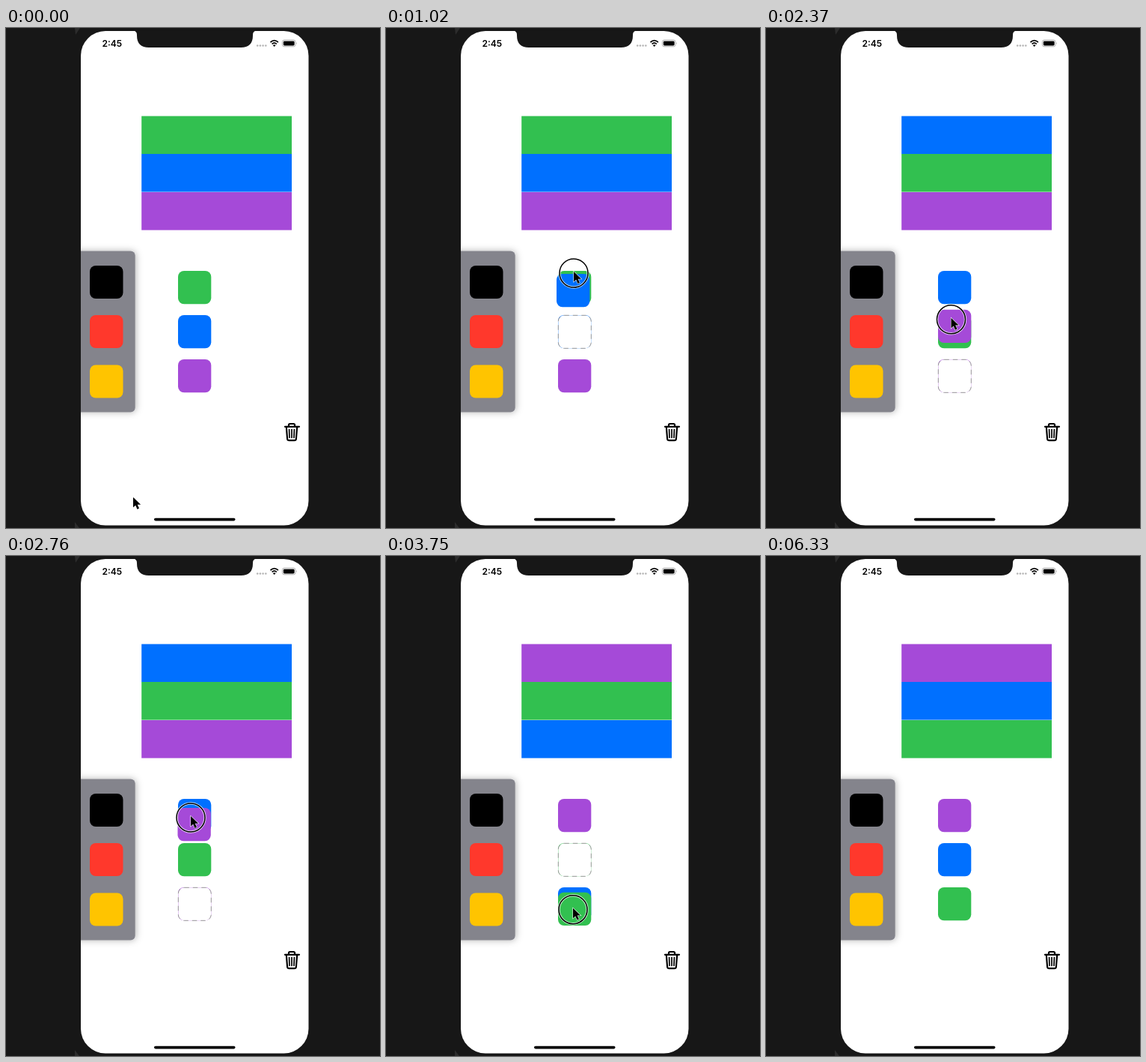
Animation of 500x667 px, one loop 6.36 s. Source, as an HTML page:

```html
<!DOCTYPE html>
<html lang="en">
<head>
<meta charset="utf-8">
<title>Colour swap</title>
<style>
html, body { margin: 0; width: 100%; height: 100%; overflow: hidden; background: #171717; }
svg { display: block; }
.clock { font: 600 12px Inter, Arial, sans-serif; }
.line { fill: none; stroke: #000; stroke-linecap: round; stroke-linejoin: round; }
</style>
</head>
<body>
<svg width="500" height="667" viewBox="0 0 500 667">
  <defs>
    <clipPath id="screen"><rect x="100" y="4" width="304.5" height="659.5" rx="33"/></clipPath>
    <filter id="shadow" x="-30%" y="-20%" width="160%" height="140%">
      <feDropShadow dx="1" dy="0" stdDeviation="5" flood-opacity=".3"/>
    </filter>
  </defs>
  <rect width="500" height="667" fill="#171717"/>
  <path d="M92 0h7l-6 9zM92 659l6 8h-6z" fill="#2c2c2c"/>
  <g clip-path="url(#screen)">
    <rect x="100" y="4" width="305" height="660" fill="#fff"/>
    <rect x="80" y="297.5" width="92.7" height="215" rx="6" fill="#84848c" filter="url(#shadow)"/>
    <rect x="112" y="317" width="44.5" height="44" rx="8"/>
    <rect x="112" y="383" width="44.5" height="44" rx="8" fill="#ff382c"/>
    <rect x="112" y="449.5" width="44.5" height="44" rx="8" fill="#ffc400"/>
  </g>
  <path d="M170 3.5Q175 4 175 9v1q0 16 16 16h123q16 0 16-16v-1Q330 4 335 3.5z" fill="#171717"/>

  <text class="clock" x="128.5" y="25">2:45</text>
  <g fill="#b5b5b5">
    <circle cx="336.2" cy="23.5" r="1.3"/><circle cx="339.9" cy="23.5" r="1.3"/>
    <circle cx="343.6" cy="23.5" r="1.3"/><circle cx="347.3" cy="23.5" r="1.3"/>
  </g>
  <path d="M353.5 19q5.2-4.6 10.4 0M355.6 21.3q3.1-2.7 6.2 0" fill="none" stroke="#000" stroke-width="1.7"/>
  <path d="M356.8 22.9q1.9-1.4 3.8 0l-1.9 2z"/>
  <rect x="369.4" y="16" width="17.6" height="8.8" rx="2.6" fill="none" stroke="#aaa" stroke-width=".9"/>
  <rect x="370.8" y="17.4" width="14.8" height="6" rx="1.4"/>
  <path d="M388 19q1.5 1.4 0 2.8z" fill="#aaa"/>

  <g class="line" stroke-width="2.2">
    <path d="M373 531.8h19M378 531v-1.5q0-1.5 1.5-1.5h5q1.5 0 1.5 1.5v1.5"/>
    <path d="M374.8 532l1.3 16q.2 2.2 2.4 2.2h7q2.2 0 2.4-2.2l1.3-16"/>
    <path d="M378.6 535.5l.4 11M382 535.5v11M385.4 535.5l-.4 11" stroke-width="1.7"/>
  </g>
  <rect x="198" y="653.8" width="108.5" height="3.6" rx="1.8"/>

  <g id="bars"></g>
  <g id="tiles"></g>
  <rect id="gap" x="230.3" width="44" height="44" rx="8" fill="#fff" stroke="#999" stroke-dasharray="6.5 5"/>
  <rect id="held" width="44.3" height="44.3" rx="8"/>
  <g id="pointer">
    <g id="touch" fill="none">
      <circle r="19" stroke="#fff" stroke-opacity=".7" stroke-width="3.4"/>
      <circle r="19" stroke="#000" stroke-width="1.5"/>
    </g>
    <path d="M0-2v13.6l3.2-2.9 2.3 5.2 2.5-1.1-2.3-5h4.4z" stroke="#fff" stroke-width="1.1" paint-order="stroke"/>
  </g>
</svg>
<script>
const LOOP = 6360;
const GREEN = '#32c050', BLUE = '#0070ff', PURPLE = '#a54ad8';
const slotY = [324, 383, 442];

// Pointer path: time, x, y
const path = [
  [0, 170, 628], [30, 170, 628], [300, 213, 500], [570, 253, 382], [780, 253, 382],
  [1020, 251, 327], [1170, 251, 326], [1440, 251, 326], [1740, 241, 427],
  [1920, 247.5, 455], [2100, 247.5, 455], [2370, 247.5, 389], [2640, 247, 349],
  [2880, 247, 349], [3240, 250, 406], [3420, 250, 406], [3810, 250, 476],
  [4110, 250, 476], [4530, 250, 458], [4800, 250, 458], [5340, 206, 460]
];
const HIDE = 5370;

// Each drag: touch down, lift, drop, source slot, target slot
const drags = [
  [570, 810, 1200, 1, 0],
  [1950, 2130, 2850, 2, 0],
  [3270, 3450, 3960, 1, 2]
];

const $ = id => document.getElementById(id);
const set = (el, attrs) => { for (const k in attrs) el.setAttribute(k, attrs[k]); };
const show = (el, on) => set(el, { visibility: on ? 'visible' : 'hidden' });
const addRect = (parent, attrs) => {
  const el = document.createElementNS('http://www.w3.org/2000/svg', 'rect');
  set(el, attrs);
  return parent.appendChild(el);
};

const bars = [117.5, 168, 219].map(y =>
  addRect($('bars'), { x: 181.2, y, width: 200.8, height: 50.6 }));
const tiles = slotY.map(y =>
  addRect($('tiles'), { x: 230, y, width: 44.3, height: 44.3, rx: 8 }));

const slope = (i, axis) => path[i] && path[i + 1]
  ? (path[i + 1][axis] - path[i][axis]) / (path[i + 1][0] - path[i][0]) : 0;

// Harmonic mean keeps the curve from overshooting and stops it at rests
const tangent = (i, axis) => {
  const a = slope(i - 1, axis), b = slope(i, axis);
  return a * b > 0 ? 2 * a * b / (a + b) : 0;
};

function pointerAt(t) {
  const next = path.findIndex(p => p[0] > t);
  if (next < 0) return path.at(-1).slice(1);
  const i = next - 1, span = path[next][0] - path[i][0], u = (t - path[i][0]) / span;
  return [1, 2].map(axis => {
    const a = path[i][axis], b = path[next][axis];
    return a + (b - a) * u * u * (3 - 2 * u)
      + span * u * (1 - u) * ((1 - u) * tangent(i, axis) - u * tangent(next, axis));
  });
}

function draw(t) {
  const order = [GREEN, BLUE, PURPLE];
  const [x, y] = pointerAt(t);
  let touching = false, drag = null;
  for (const d of drags) {
    const [down, lift, drop, from, to] = d;
    if (t >= drop) [order[from], order[to]] = [order[to], order[from]];
    else if (t >= down) {
      touching = true;
      if (t >= lift) drag = d;
    }
  }
  order.forEach((fill, i) => {
    set(bars[i], { fill });
    set(tiles[i], { fill });
  });
  show($('gap'), drag);
  show($('held'), drag);
  if (drag) {
    const [down, , , from] = drag, [grabX, grabY] = pointerAt(down);
    set($('gap'), { y: slotY[from] + .3 });
    set($('held'), { x: 230 + x - grabX, y: slotY[from] + y - grabY, fill: order[from] });
  }
  set($('pointer'), { transform: `translate(${x} ${y})`, display: t < HIDE ? 'inline' : 'none' });
  show($('touch'), touching);
}

const start = performance.now();
function tick() {
  draw((performance.now() - start) % LOOP);
  requestAnimationFrame(tick);
}
tick();
</script>
</body>
</html>
```
